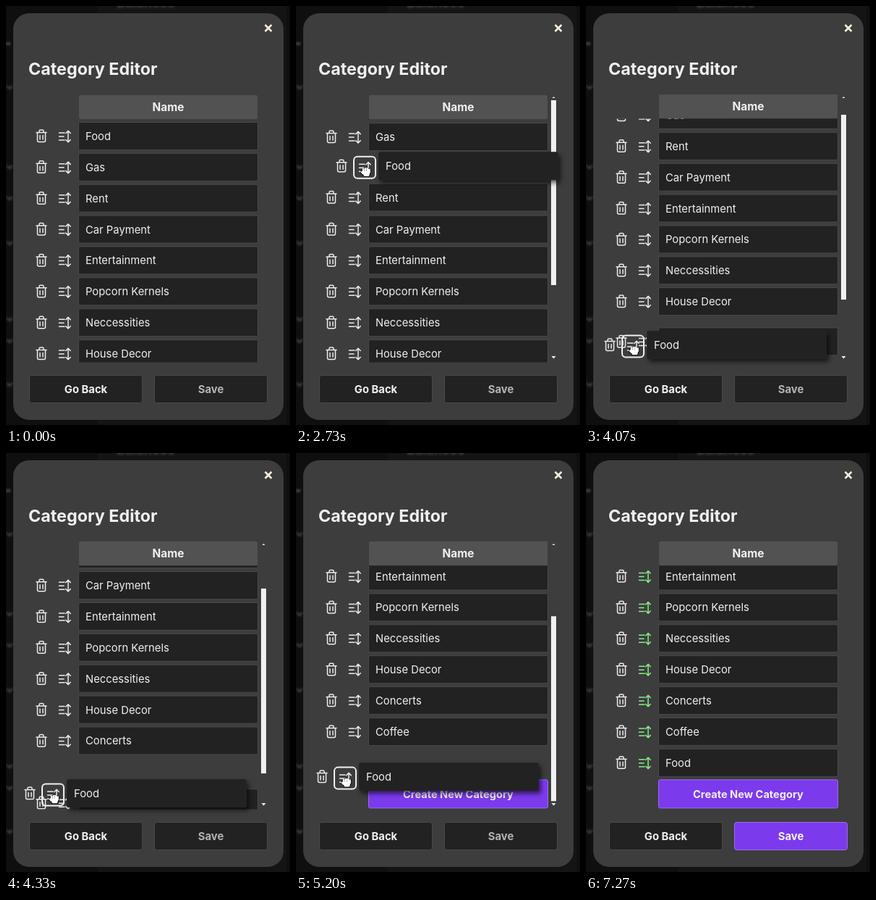
Recreate the animation shown at these times as an HTML page. Size 393x578 px, loop 7.6 s.

```html
<!DOCTYPE html>
<html lang="en">
<head>
<meta charset="utf-8">
<title>Category Editor</title>
<style>
  html, body { margin: 0; width: 100%; height: 100%; overflow: hidden; background: #0f0f10; }
  svg { display: block; font: 400 14.8px Inter, sans-serif; font-optical-sizing: none; fill: #f0f0f0; }
  .bold { font-weight: 700; text-anchor: middle; }
  .box { fill: #222; stroke: #494949; }
  .purple { fill: #7c3aed; stroke: #9c6bf3; }
  .icon { fill: none; stroke: #ececec; stroke-width: 1.5; stroke-linecap: round; stroke-linejoin: round; }
  .ring { fill: none; stroke: #f0f0f0; stroke-width: 2; }
  .done .grip { stroke: #86ef86; }
  #saveText { fill: #b4b4b4; }
  .done #saveText { fill: #f5f5f5; }
  .done #save { fill: #7c3aed; stroke: #9c6bf3; }
  .lifted .box { stroke: #252525; filter: drop-shadow(3px 4px 3px #0009); }
  .lifted .handle { transform: translateY(2px); }
  #cursor path { stroke-linejoin: round; stroke-linecap: round; }
</style>
</head>
<body>
<svg id="stage" width="393" height="578" viewBox="0 0 393 578">
  <defs>
    <clipPath id="view"><rect x="20" y="155.5" width="364" height="336"/></clipPath>
    <filter id="blur" x="-50%" y="-50%" width="200%" height="200%"><feGaussianBlur stdDeviation="1.6"/></filter>
    <path id="trash" d="M-7-5H7M-3-5V-7Q-3-8.5-1.5-8.5H1.5Q3-8.5 3-7V-5M-5.5-5V6Q-5.5 8-3.5 8H3.5Q5.5 8 5.5 6V-5M-2-1V4.500M2-1V4.500"/>
    <path id="grip" d="M-7.500-5H0M-7.500 0H-1M-7.500 5H0M5-7.500V7.500M1.800-4.500L5-7.800L8.200-4.500M1.800 4.500L5 7.800L8.200 4.500"/>
    <path id="open" d="M-3 2L-4.500-5M0 1L-1-7.500M3 1L3-6.500M5.500 3L6.500-4M-3 5L-7 1M-3 3H5L4 7H-1Z"/>
    <path id="fist" d="M-3 2V-3M0 1V-4M3 1V-4M5.500 3V-2.500M-3 4L-5.500 1M-3 2H5L4 6H-1Z"/>
  </defs>

  <!-- dimmed page behind the dialog -->
  <path fill="#141414" d="M127 0H388V578H127Z"/>
  <g filter="url(#blur)">
    <text x="153" y="2" font-weight="700" font-size="18" fill="#484848">Balances</text>
    <path d="M0 52H6" stroke="#555" stroke-width="3"/>
    <g id="chevrons" fill="none" stroke="#4a4a4a" stroke-width="2"></g>
  </g>

  <rect x="10" y="10" width="374" height="561" rx="22" fill="#3d3d3d"/>
  <path d="M358.500 26L367.500 35M367.500 26L358.500 35" stroke="#f7eedd" stroke-width="2.500"/>
  <text x="31" y="95" font-size="23.300" font-weight="700">Category Editor</text>

  <g clip-path="url(#view)"><g id="list">
    <g id="create">
      <rect class="purple" x="100.500" y="-19.500" width="248" height="39" rx="2"/>
      <text class="bold" x="224.500" y="5.500" font-size="14.600">Create New Category</text>
    </g>
  </g></g>
  <g id="head">
    <rect x="101" y="123" width="247" height="33" rx="2" fill="#525252"/>
    <text class="bold" x="224.500" y="145" font-size="15.400">Name</text>
  </g>

  <rect class="box" x="32.500" y="509.500" width="156" height="38" rx="3"/>
  <text class="bold" x="110.500" y="534">Go Back</text>
  <rect class="box" id="save" x="205.500" y="509.500" width="156" height="38" rx="3"/>
  <text class="bold" id="saveText" x="283.500" y="534">Save</text>

  <g id="bar">
    <path d="M354.500 127L356.500 125L358.500 127ZM353.500 483H359.500L356.500 486.500Z"/>
    <rect id="thumb" x="353" width="7" height="255"/>
  </g>
  <g id="top"></g>
  <g id="cursor">
    <path id="arrow" d="M0 0V15L3.500 11.800L6 17.500L8.500 16.400L6 11H10.800Z" fill="#fff" stroke="#000"/>
    <g id="hand">
      <use stroke="#000" stroke-width="4.600"/>
      <use stroke="#fff" fill="#fff" stroke-width="2.700"/>
    </g>
  </g>
</svg>
<script>
const LOOP = 7600, LIFT = 2200, RELEASE = 5730, DROP = 5860, BLUR = 7270;
const FIRST = 179.5, PITCH = 42.86, MAX_SCROLL = 138;
const names = ['Food', 'Gas', 'Rent', 'Car Payment', 'Entertainment', 'Popcorn Kernels',
  'Neccessities', 'House Decor', 'Concerts', 'Coffee'];
// when each row below Food starts to slide up one place
const slideStart = [0, 2505, 2707, 2860, 3000, 3255, 3345, 3398, 3910, 4960];

// time, x offset, y of the dragged row
const dragPath = [[2200, -8, 164.5], [2470, -8, 164.5], [2730, 14, 220.5], [2880, 22, 262],
  [3200, 0, 330], [3270, 0, 330], [3470, -8.5, 406.5], [3800, -16, 460], [4000, -16, 467.5],
  [4070, -16, 467.5], [4600, -16, 471.5], [4930, -16, 471.5], [5600, -8.5, 410],
  [5730, -8.5, 410], [5860, 0, 427.2]];
// time, x, y of the free pointer
const enterPath = [[920, 386, 330], [1400, 190, 245], [1670, 79, 196], [1720, 79, 196], [1930, 74, 171]];
const leavePath = [[6010, 73.5, 417], [6130, 92, 462], [6400, 230, 592]];

const $ = id => document.getElementById(id);
const clamp = v => Math.max(0, Math.min(1, v));
const smooth = p => p * p * (3 - 2 * p);
const move = (el, x, y) => el.setAttribute('transform', `translate(${x} ${y})`);
const show = (el, on) => el.style.display = on ? '' : 'none';

function along(path, t) {
  let i = 1;
  while (i < path.length - 1 && t > path[i][0]) i++;
  const [a, b] = [path[i - 1], path[i]], p = clamp((t - a[0]) / (b[0] - a[0]));
  return [a[1] + (b[1] - a[1]) * p, a[2] + (b[2] - a[2]) * p];
}

const rows = names.map(name => {
  const g = document.createElementNS('http://www.w3.org/2000/svg', 'g');
  g.innerHTML = `<rect class="box" x="100.5" y="-19" width="248" height="38" rx="2"/>
    <text x="110" y="5.5">${name}</text>
    <use class="icon" href="#trash" x="49"/>
    <g class="handle"><use class="icon grip" href="#grip" x="81" y=".5"/></g>`;
  $('list').append(g);
  return g;
});
const food = rows[0];
food.querySelector('.handle').innerHTML += '<rect class="ring" x="66" y="-15" width="30" height="30" rx="5"/>';
const ring = food.querySelector('.ring');
$('chevrons').innerHTML = [112, 222, 265, 327, 432, 462, 522]
  .map(y => `<path d="M1 ${y - 2}L5 ${y + 2}L9 ${y - 2}"/>`).join('');

function drawCursor(t, drag, held) {
  const [x, y] = held ? [drag[0] + 82, drag[1] + 6.5] : along(t < LIFT ? enterPath : leavePath, t);
  const onHandle = held || x < 90 && t < 6100;
  show($('cursor'), t >= 930 && t < 6400);
  show($('hand'), onHandle);
  show($('arrow'), !onHandle);
  for (const u of $('hand').children) u.setAttribute('href', held ? '#fist' : '#open');
  move($('cursor'), x, y);
  show($('bar'), t >= 930 && t < 6400 && x < 362 && y < 492);
}

function draw(t) {
  const scroll = MAX_SCROLL * clamp((t - 3930) / 670);
  const slotY = i => FIRST + i * PITCH - scroll;
  const lifted = t >= LIFT && t < DROP, done = t >= DROP;
  const drag = along(dragPath, t);

  rows.forEach((row, i) => {
    if (i) move(row, 0, slotY(i - smooth(clamp((t - slideStart[i]) / 250))));
  });
  move($('create'), 0, slotY(10) + .2);
  move($('head'), 0, -Math.min(1, scroll));
  $('thumb').setAttribute('y', 130 + scroll * .69);

  const layer = lifted ? $('top') : $('list');
  if (food.parentNode !== layer) layer.append(food);
  if (lifted) move(food, ...drag);
  else move(food, 0, slotY(done ? 9 : 0));
  food.classList.toggle('lifted', lifted);
  show(ring, t >= LIFT && t < BLUR);
  $('stage').classList.toggle('done', done);

  drawCursor(t, drag, t >= LIFT && t < RELEASE);
}

const start = performance.now();
(function tick() {
  draw((performance.now() - start) % LOOP);
  requestAnimationFrame(tick);
})();
</script>
</body>
</html>
```
